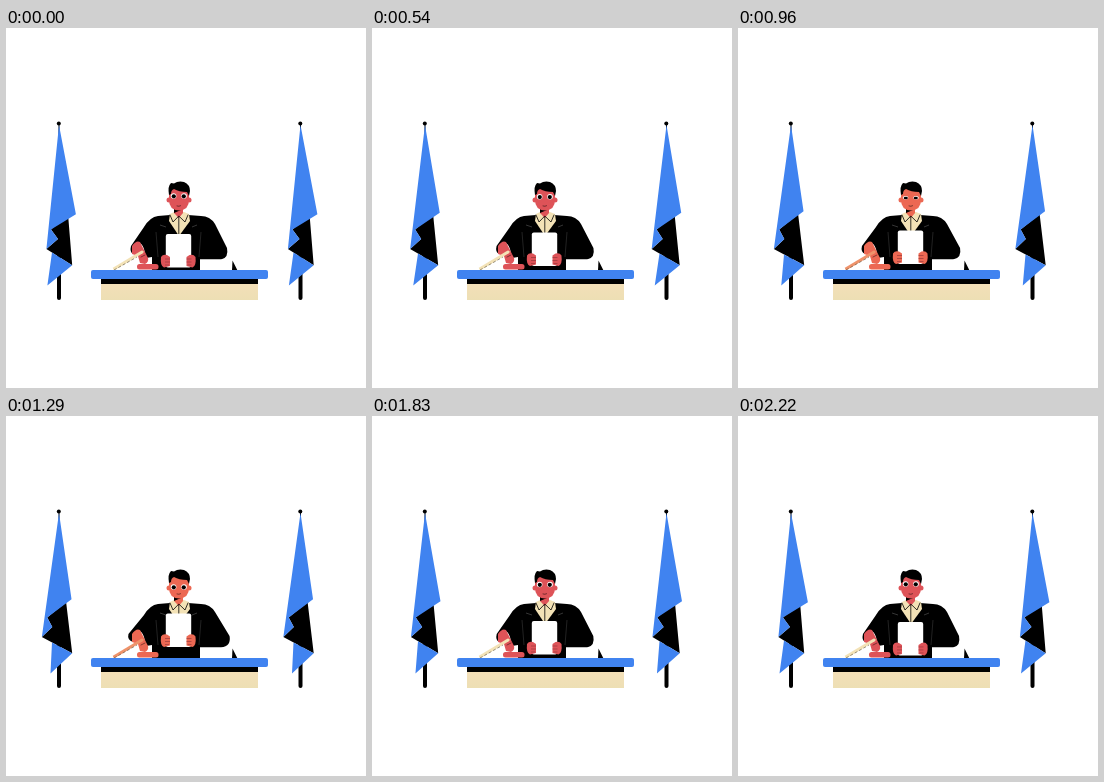
An HTML page for the animation above (2.25 s loop, 360x360 px).

```html
<!DOCTYPE html>
<html lang="en">
<head>
<meta charset="utf-8">
<title>Judge at the bench</title>
<style>
  html, body { margin: 0; width: 100%; height: 100%; overflow: hidden; background: #fff; }
  svg { display: block; width: 100%; height: 100%; --warm: 0%; }
  .blue { fill: #4083f0; }
  .skin { fill: color-mix(in srgb, #ee6a52 var(--warm), #de5358); }
  .cream { fill: #f3e2b6; }
  .handle { stroke: color-mix(in srgb, #ee8a62 var(--warm), #f3e2b6); stroke-width: 3; stroke-linecap: round; }
  .line { fill: none; stroke: #000; stroke-width: .8; stroke-linecap: round; stroke-linejoin: round; }
</style>
</head>
<body>
<svg id="stage" viewBox="0 0 360 360">
  <defs>
    <linearGradient id="wood" x2="0" y2="1">
      <stop stop-color="#f3dfb8"/><stop offset="1" stop-color="#eddfb4"/>
    </linearGradient>
    <g id="flag">
      <circle cx="52.8" cy="95.5" r="2"/>
      <path d="M53 95V110" stroke="#000"/>
      <path d="M53 215V270" stroke="#000" stroke-width="4" stroke-linecap="round"/>
      <path id="lining"/>
      <path id="cloth" class="blue"/>
    </g>
  </defs>

  <use href="#flag"/>
  <use href="#flag" x="241.5"/>

  <path id="robe"/>
  <path d="M150 204L152 229M195 204L193 229" stroke="#3a3a3a" stroke-width=".6"/>
  <path d="M154 197L160 199M186 199L191 197" stroke="#5a5a5a" stroke-width=".6"/>

  <path class="cream" d="M164 186L168 184H178L183 186L184 193L173 208L163 193Z"/>
  <path class="skin" d="M168 178H177V185L172.8 190L168 185Z"/>
  <path d="M168 180L175 182L168 185Z"/>
  <path class="line" d="M164 187L167 194L172.8 188L179 194L182 187M172.8 189V208"/>

  <circle class="skin" cx="163" cy="172" r="2.5"/>
  <circle class="skin" cx="183" cy="172" r="2.5"/>
  <path class="skin" d="M163 164Q163 159 173 159T183 164V172Q183 182 173 182.5Q163 182 163 172Z"/>
  <path d="M163 167Q161.5 158 165 155L168 155.5Q172 152.7 178 154Q184 156.5 184 163L183 168L181 164Q173 164 168 161Q165 162 165 166Z"/>
  <g id="eyes">
    <circle cx="167.6" cy="168" r="2.8" fill="#fff"/><circle cx="167.8" cy="168.3" r="2.1"/>
    <circle cx="178" cy="168" r="2.8" fill="#fff"/><circle cx="177.8" cy="168.3" r="2.1"/>
  </g>
  <path class="line" d="M171 178Q173 178.8 174.6 177.8" stroke-opacity=".6"/>

  <path d="M194 231.5H226L228 242H194Z" fill="#fff"/>
  <path d="M226.5 232.5L231.5 242.5H226Z"/>

  <g id="sheet">
    <rect x="159.8" y="206" width="25.4" height="33.5" rx="2" fill="#fff"/>
    <g id="hand">
      <path class="skin" d="M155 229Q157 225.7 161 227L164 229V238L158 239.5Q154 238 155 229Z"/>
      <path d="M159 231H164M159 234H164M159 237H163" stroke="#8d3336" stroke-width=".6"/>
    </g>
    <use href="#hand" transform="matrix(-1 0 0 1 344.5 0)"/>
  </g>

  <path class="skin" d="M126 218Q130 212 134 214L142 230Q143 234 139 236L134 235L132 228L126 226Z"/>
  <path class="handle" d="M108.5 240.5L136 224"/>
  <path d="M108 242L131 229" stroke="#594d38" stroke-width=".6" stroke-dasharray="3 2"/>
  <path class="line" d="M135 229L139 227" stroke-opacity=".55"/>
  <rect class="skin" x="131" y="236" width="21.5" height="5.5" rx="2.5"/>

  <rect x="95" y="250" width="157" height="7"/>
  <rect x="95" y="256" width="157" height="16" fill="url(#wood)"/>
  <rect class="blue" x="85" y="242" width="177" height="9" rx="2"/>
</svg>
<script>
  const LOOP = 2250, STEP = 30;
  const el = id => document.getElementById(id);
  const poly = points => "M" + points.map(p => p.join(" ")).join("L") + "Z";
  const lifts = [[0, 0], [300, .5], [540, 1.5], [960, 3.5], [1290, 8.5], [1830, 1], [LOOP, 0]];

  function liftAt(t) {
    const i = lifts.findIndex(([time]) => time > t);
    const [t0, a] = lifts[i - 1], [t1, b] = lifts[i];
    return a + (b - a) * (t - t0) / (t1 - t0);
  }

  // The hem trails behind the rest of the cloth.
  function drawFlag(angle) {
    const sway = Math.cos(angle), trail = Math.cos(angle - .8);
    const tip = [67.6 + 2.3 * sway, 184.7 + 1.5 * sway];
    const notch = [43 + 2 * sway, 201.5];
    const fold = [49 + 3 * sway, 211];
    const edge = [38 + 2.4 * sway, 221];
    const corner = [66.2, 237.3];
    const tuck = [46, 221 + 16.3 * (46 - edge[0]) / (corner[0] - edge[0])];
    const hem = [42.7 - 1.9 * trail, 257.5];
    el("lining").setAttribute("d", poly([notch, [61 + sway, 186], corner, edge, fold]));
    el("cloth").setAttribute("d",
      poly([[53, 97], tip, notch, fold, edge]) + poly([tuck, corner, hem]));
  }

  function drawRobe(lift) {
    const w = lift * .3;
    el("robe").setAttribute("d", `M164 187L152 188Q144 189 138 199L${125 - w} 218
      Q${123.5 - w} 224 127 226L130 217Q135 212 138 221L140 230L146 229V242H194V231.5H215
      Q${223 + w} 230 ${221 + w} 220L209 196Q204 188 195 188L182 187L173 208Z`);
  }

  function frame(now) {
    const t = Math.floor(now % LOOP / STEP) * STEP;
    const angle = 2 * Math.PI * t / LOOP;
    const lift = liftAt(t);
    drawFlag(angle);
    drawRobe(lift);
    el("stage").style.setProperty("--warm", 100 * Math.max(0, -Math.cos(angle)) + "%");
    el("sheet").setAttribute("transform", `translate(0 ${-lift})`);
    const open = 1 - .4 * Math.max(0, 1 - Math.abs(t - 960) / 120);
    el("eyes").setAttribute("transform",
      `translate(0 ${168 + Math.min(lift * .5, 3)}) scale(1 ${open}) translate(0 -168)`);
    requestAnimationFrame(frame);
  }
  requestAnimationFrame(frame);
</script>
</body>
</html>
```
